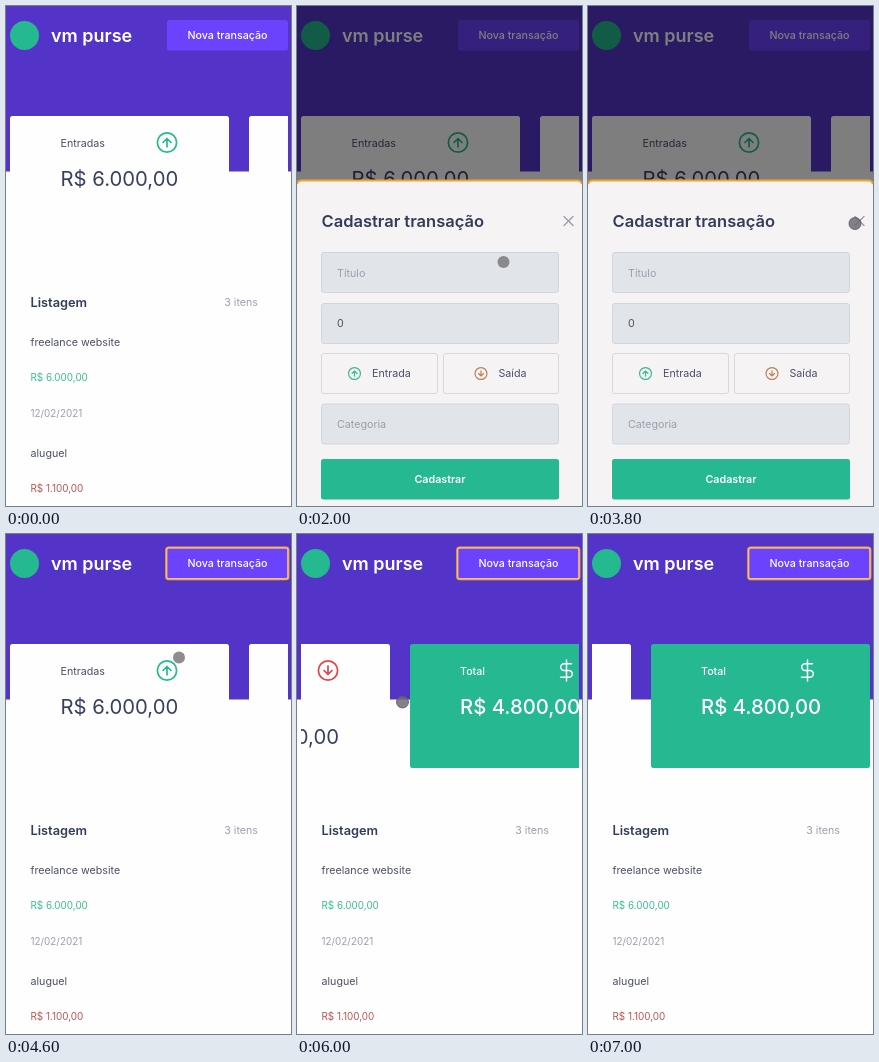
Write an HTML page that moves like this. It is 285 by 500 pixels and loops after 7700 ms.

```html
<!DOCTYPE html>
<html lang="pt-BR">
<head>
<meta charset="utf-8">
<title>Finanças</title>
<style>
  html, body { margin: 0; width: 100%; height: 100%; overflow: hidden; background: #fefefe; }
  svg { display: block; width: 100vw; height: 100vh; }
  text { font: 400 10.7px Inter, "Open Sans", sans-serif; fill: #4a5068; }
  .big { font-size: 20.3px; fill: #363f5f; }
  .small { font-size: 9.9px; }
  .mid { font-weight: 500; }
  .bold { font-weight: 600; fill: #333d58; }
  .soft { fill: #9a9fae; }
  .white { fill: #fff; }
  .end { text-anchor: end; }
  .center { text-anchor: middle; }
  .field { fill: #e1e5e9; stroke: #d2d6dc; }
  .choice { fill: none; stroke: #d8d8dd; }
  .icon { fill: none; stroke-linecap: round; stroke-linejoin: round; }
</style>
</head>
<body>
<svg viewBox="0 0 285 500" preserveAspectRatio="none">
  <defs>
    <clipPath id="view"><rect x="4" y="105" width="278" height="135"/></clipPath>
    <g id="up"><circle r="9.6"/><path d="M0 4.3V-4M-4 0L0 -4L4 0"/></g>
    <g id="down"><use href="#up" transform="scale(1 -1)"/></g>
  </defs>

  <rect width="285" height="500" fill="#fefefe"/>
  <rect width="285" height="165.5" fill="#5433c8"/>
  <circle cx="18.5" cy="29.5" r="14.5" fill="#25b98f"/>
  <text class="bold white" x="45" y="35.5" style="font-size:18px">vm purse</text>
  <rect x="161" y="14" width="121" height="30.5" rx="2.5" fill="#6b43fc"/>
  <g id="ring" fill="none">
    <rect x="160.2" y="13.4" width="122.2" height="31.8" rx="2.5" stroke="#f5a838" stroke-width="2"/>
    <rect x="160.8" y="14" width="121" height="30.6" rx="2" stroke="#fbd48c" stroke-width=".8"/>
  </g>
  <text class="white mid center" x="221.5" y="33.2">Nova transação</text>

  <g clip-path="url(#view)">
    <g id="cards">
      <g transform="translate(4 110)">
        <rect width="219" height="124" rx="2.5" fill="#fefefe"/>
        <text x="50.5" y="30.5">Entradas</text>
        <use class="icon" href="#up" x="157" y="26.5" stroke="#25b98f" stroke-width="1.7"/>
        <text class="big" x="50.5" y="69.5">R$ 6.000,00</text>
      </g>
      <g transform="translate(243 110)">
        <rect width="219" height="124" rx="2.5" fill="#fefefe"/>
        <text x="50.5" y="30.5">Saídas</text>
        <use class="icon" href="#down" x="157" y="26.5" stroke="#e0444c" stroke-width="1.7"/>
        <text class="big" x="50.5" y="69.5">-</text>
        <text class="big end" x="168" y="99.5">R$ 1.200,00</text>
      </g>
      <g transform="translate(482 110)">
        <rect width="219" height="124" rx="2.5" fill="#25b891"/>
        <text class="white mid" x="50" y="30.5">Total</text>
        <path class="icon" stroke="#fff" stroke-width="1.5" transform="translate(156.5 26.5)"
          d="M0 -10.5V10.5M5 -6.8H-2.4A3.4 3.4 0 0 0 -2.4 0H2.4A3.4 3.4 0 0 1 2.4 6.8H-6"/>
        <text class="big white mid" x="50" y="69.5">R$ 4.800,00</text>
      </g>
    </g>
  </g>

  <text class="bold" x="24.5" y="300.8" style="font-size:12.8px">Listagem</text>
  <text class="soft end" x="252" y="300">3 itens</text>
  <text x="24.5" y="340.3">freelance website</text>
  <text class="small" x="24.5" y="375.2" style="fill:#3bbd93">R$ 6.000,00</text>
  <text class="small soft" x="24.5" y="410.6">12/02/2021</text>
  <text x="24.5" y="451">aluguel</text>
  <text class="small" x="24.5" y="486" style="fill:#b9544f">R$ 1.100,00</text>

  <g id="modal">
    <rect width="285" height="500" fill="#000" opacity=".5"/>
    <path d="M0 500V179Q0 175 4 175H281Q285 175 285 179V500Z" fill="#f6f3f4"/>
    <path d="M0 178Q1 174.6 4 174.6H281Q284 174.6 285 178" fill="none" stroke="#f0a332" stroke-width="2"/>
    <text class="bold" x="24.5" y="220.8" style="font-size:16.5px">Cadastrar transação</text>
    <path class="icon" d="M267 210.5L276 219.5M276 210.5L267 219.5" stroke="#999ba6" stroke-width="1.3"/>
    <rect class="field" x="24.5" y="246.5" width="237" height="40" rx="2.5"/>
    <text class="soft" x="40" y="270.6">Título</text>
    <rect class="field" x="24.5" y="297.5" width="237" height="40" rx="2.5"/>
    <text x="40" y="321.2">0</text>
    <rect class="choice" x="24.5" y="347.5" width="116" height="40" rx="2.5"/>
    <use class="icon" href="#up" transform="translate(57.5 367.5) scale(.62)" stroke="#38ba91" stroke-width="1.9"/>
    <text x="75" y="371.2">Entrada</text>
    <rect class="choice" x="146.5" y="347.5" width="115" height="40" rx="2.5"/>
    <use class="icon" href="#down" transform="translate(184 367.5) scale(.62)" stroke="#b98056" stroke-width="1.9"/>
    <text x="201.5" y="371.2">Saída</text>
    <rect class="field" x="24.5" y="398" width="237" height="40" rx="2.5"/>
    <text class="soft" x="40" y="421.8">Categoria</text>
    <rect x="24" y="453" width="238" height="40.5" rx="2.5" fill="#25b891"/>
    <text class="bold white center" x="143" y="477">Cadastrar</text>
  </g>

  <g id="touch">
    <circle r="6" fill="#767478" fill-opacity=".82"/>
    <circle id="press" r="6" fill="#4b4450" fill-opacity=".15" stroke="#5d5468" stroke-opacity=".8"/>
  </g>
</svg>
<script>
  const LOOP = 7700, STEP = 100;
  const OPEN = 1300, CLOSE = 4000;

  // time, x, y
  const path = [
    [400, 291, 150], [900, 246, 35], [1400, 246, 35], [2000, 206.5, 256],
    [2200, 196, 284], [2300, 196, 284], [3100, 176, 366], [3700, 267, 217.5],
    [4100, 267, 217.5], [4600, 173, 123.5], [4800, 230, 168], [4900, 230, 168],
    [5400, 55, 168], [5700, 220, 168], [6000, 105.5, 168], [6200, 55, 168],
    [6400, 55, 168], [6900, 120, 508]
  ];
  // time, offset
  const scroll = [[4900, 0], [5400, 175], [5700, 254], [6000, 369], [6200, 419]];
  const presses = [[1100, 1500], [3800, 4000], [4900, 5400], [5700, 6300]];

  const $ = id => document.getElementById(id);
  const show = (id, on) => $(id).setAttribute("visibility", on ? "visible" : "hidden");
  const within = (t, [a, b]) => t >= a && t < b;

  function sample(keys, t) {
    const next = keys.findIndex(k => k[0] > t);
    if (next === 0) return keys[0].slice(1);
    if (next < 0) return keys[keys.length - 1].slice(1);
    const a = keys[next - 1], b = keys[next];
    const p = (t - a[0]) / (b[0] - a[0]);
    return a.slice(1).map((v, i) => v + (b[i + 1] - v) * p);
  }

  function draw(time) {
    const t = Math.floor((time % LOOP) / STEP) * STEP;
    const [x, y] = sample(path, t);
    $("cards").setAttribute("transform", `translate(${-sample(scroll, t)[0]} 0)`);
    $("touch").setAttribute("transform", `translate(${x} ${y})`);
    const touching = within(t, [400, 7000]);
    show("touch", touching);
    show("press", touching && presses.some(p => within(t, p)));
    show("modal", within(t, [OPEN, CLOSE]));
    show("ring", t >= CLOSE);
  }

  const start = performance.now();
  function tick() {
    draw(performance.now() - start);
    requestAnimationFrame(tick);
  }
  tick();
</script>
</body>
</html>
```
